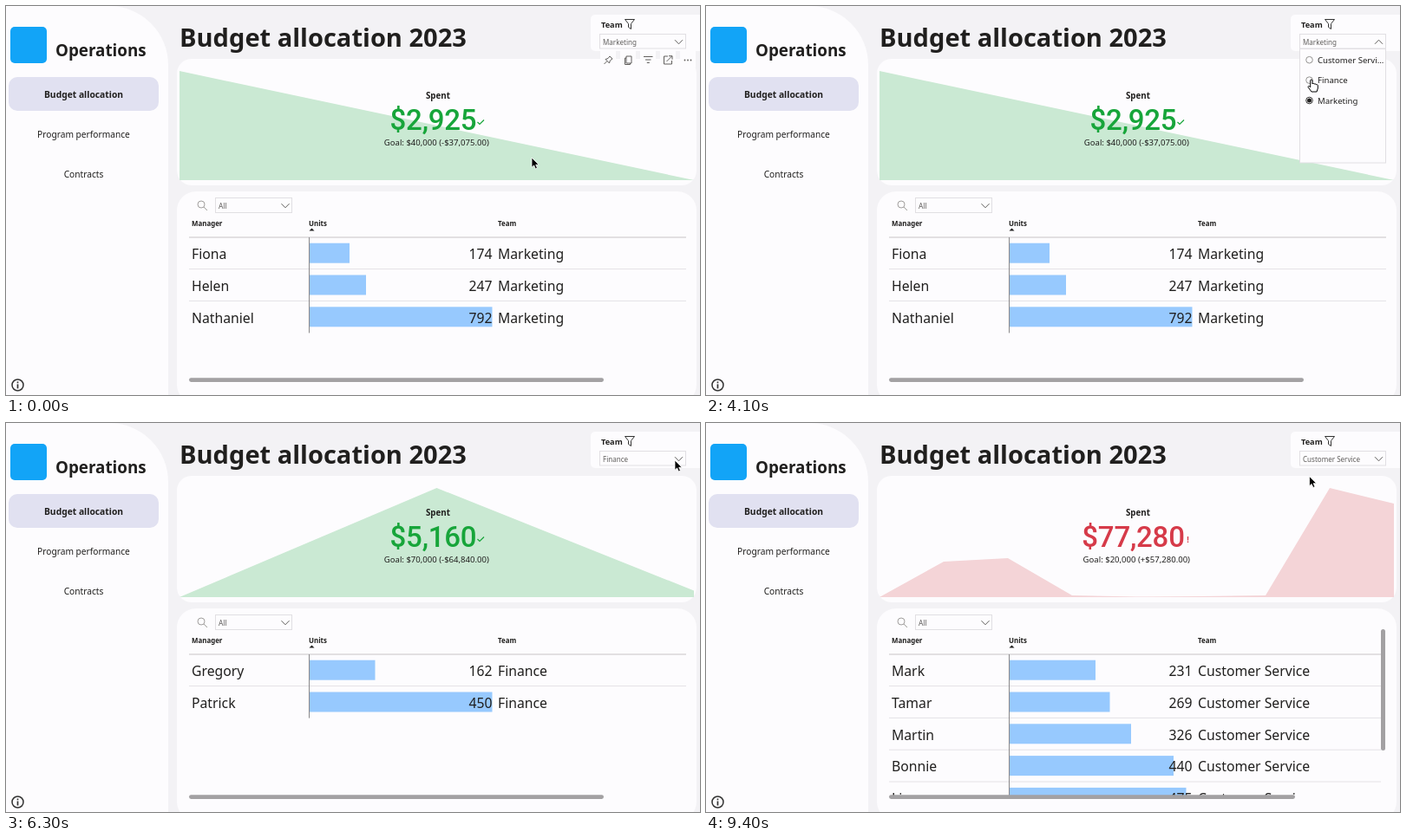
Animation, 800 px wide and 449 px high, one loop 9500 ms. Source, as an HTML page:

```html
<!DOCTYPE html>
<html lang="en">
<head>
<meta charset="utf-8">
<title>Budget allocation</title>
<style>
  html, body { margin: 0; width: 100%; height: 100%; overflow: hidden; background: #f3f2f5; }
  svg { display: block; font-family: "Noto Sans", "Open Sans", sans-serif; }
</style>
</head>
<body>
<svg id="stage" width="800" height="449" viewBox="0 0 800 449">
  <g id="page"></g>
  <g id="cursor"></g>
</svg>
<script>
const LOOP = 9500;
const INK = '#201f1e', PANEL = '#fdfcfe', GREY = '#605e5c';
const TEAMS = ['Customer Service', 'Finance', 'Marketing'];
const BASE = 201, ROW = 36.8;

const DATA = {
  'Marketing': {
    value: '$2,925', goal: 'Goal: $40,000 (-$37,075.00)', good: true,
    trend: [[200, 75], [793, BASE]],
    rows: [['Fiona', 174, 396], ['Helen', 247, 415], ['Nathaniel', 792, 560.5]]
  },
  'Finance': {
    value: '$5,160', goal: 'Goal: $70,000 (-$64,840.00)', good: true,
    trend: [[200, BASE], [496.5, 75], [793, 193.5]],
    rows: [['Gregory', 162, 425.5], ['Patrick', 450, 560.5]]
  },
  'Customer Service': {
    value: '$77,280', goal: 'Goal: $20,000 (+$57,280.00)', good: false,
    trend: [[200, BASE], [274, 160], [348, 156], [422, 199], [496, 200.5],
            [570, 200], [645, 199], [719, 75], [793, 93]],
    rows: [['Mark', 231, 449], ['Tamar', 269, 465.5], ['Martin', 326, 490],
           ['Bonnie', 440, 539], ['Liora', 475, 553.5]]
  }
};

const text = (x, y, size, str, opt = '') =>
  `<text x="${x}" y="${y}" font-size="${size}" fill="${INK}" ${opt}>${str}</text>`;
const rect = (x, y, w, h, fill, r = 0, opt = '') =>
  `<rect x="${x}" y="${y}" width="${w}" height="${h}" rx="${r}" fill="${fill}" ${opt}/>`;
const path = (d, stroke = GREY, width = 1, fill = 'none') =>
  `<path d="${d}" stroke="${stroke}" stroke-width="${width}" fill="${fill}"/>`;
const circle = (x, y, r, opt) => `<circle cx="${x}" cy="${y}" r="${r}" ${opt}/>`;
const chevron = (x, y, dir) => path(`M${x - 4.5} ${y - 2.3 * dir}l4.5 ${4.6 * dir}l4.5 ${-4.6 * dir}`);
const BOLD = 'font-weight="700"', MID = 'text-anchor="middle"', END = 'text-anchor="end"';
const FRAME = 'stroke="#e1dfe3"';

function sidebar() {
  return path('M0 0H119A68 68 0 0 1 187 68V449H0Z', 'none', 0, PANEL) +
    rect(5, 24, 42, 42, '#12a4f7', 5) +
    text(57, 57.5, 18.8, 'Operations', BOLD) +
    rect(3, 82, 173, 39, '#e1e1f1', 10) +
    text(89.5, 106, 10.3, 'Budget allocation', BOLD + MID) +
    text(89.5, 152, 10.2, 'Program performance', MID) +
    text(89.5, 197.5, 10.2, 'Contracts', MID) +
    circle(13.5, 437.5, 6.5, 'fill="none" stroke="#333" stroke-width="1.5"') +
    path('M13.5 436.5V441.5M13.5 433.5V435.2', '#333', 1.7);
}

function budgetCard({ value, goal, good, trend }) {
  const color = good ? '#17a53a' : '#d63a49';
  const area = `M200 ${BASE}L${trend.join('L')}L793 ${BASE}Z`;
  return rect(197, 61, 599, 146, PANEL, 17) +
    path(area, 'none', 0, good ? '#cae9d3' : '#f4d4d7') +
    text(498, 107, 9.8, 'Spent', BOLD + MID) +
    `<text x="492.5" y="143" font-size="33" font-weight="500" letter-spacing="-.2" fill="${color}"
      text-anchor="middle" font-family="Roboto, sans-serif">${value}</text>` +
    (good ? path('M543.5 134l2.5 2.5l5-5', color, 1.2)
          : path('M555.5 131v4.5M555.5 136.5v1.5', color, 1.3)) +
    text(496.3, 160.5, 9.55, goal, MID);
}

function tableCard(team, { rows }) {
  const long = rows.length > 4;
  const right = long ? 778 : 784;
  const bottom = long ? 430 : 267 + rows.length * ROW;
  return rect(197, 214, 599, 245, PANEL, 22) +
    circle(225, 229, 4, 'fill="none" stroke="#a19f9d"') + path('M228 232l4 4', '#a19f9d') +
    rect(241.5, 221.5, 88, 17, PANEL, 0, FRAME) +
    text(245, 234, 8.4, 'All', `style="fill:${GREY}"`) + chevron(322, 230.5, 1) +
    text(214, 253.5, 7.9, 'Manager', BOLD) + text(349, 253.5, 7.9, 'Units', BOLD) +
    text(567, 253.5, 7.9, 'Team', BOLD) +
    path('M349.5 259.5l3-3l3 3z', 'none', 0, INK) +
    path(`M211 267H${right}`, '#c8c6c8', 1.2) +
    '<clipPath id="body"><path d="M200 260H790V430H200Z"/></clipPath><g clip-path="url(#body)">' +
    rows.map(([name, units, end], i) => {
      const y = i * ROW;
      return (i ? path(`M211 ${266.8 + y}H${right}`, '#e4e2e6') : '') +
        rect(349.5, 273.7 + y, end - 349.5, 23, '#97c9fe') +
        text(214, 292 + y, 15.75, name) +
        text(560.5, 292 + y, 15.75, units, END) +
        text(567, 292 + y, 15.75, team);
    }).join('') + path(`M349.5 267V${bottom}`, '#8a888a') + '</g>' +
    rect(211, 429.3, long ? 468 : 478, 4.6, '#a3a1a3', 2.3) +
    (long ? rect(778, 238, 5, 140, '#a3a1a3', 2.5) : '');
}

function slicer(label, open) {
  return rect(674, 10, 130, 42, PANEL, 5) +
    text(686, 25, 9.2, 'Team', BOLD) +
    path('M713.5 15.5H724.5L720.5 20.5V26.5L717.5 24.5V20.5Z', '#333') +
    rect(684.5, 32.5, 99, 16.5, PANEL, 0, FRAME) +
    text(688, 45, 8.05, label, `style="fill:${GREY}"`) +
    chevron(775.5, 41.5, open ? -1 : 1);
}

function toolbar() {
  return [694, 717, 740, 763, 786].map(x => rect(x - 9, 52, 18, 19, PANEL)).join('') +
    path('M689.5 67l3.5-3.5M691 61.5l4.5 4.5l.8-3l2.7-2l-3-3l-2 2.5z') +
    path('M715 58h6v8h-6zM715 60h-1.5v7.5h6V66') +
    path('M735 58.5h10.5M737 62h6.5M738.8 65.5h3') +
    path('M763 58h-4.5v9h9V63M761.5 64l6-6M764 57.7h4v4') +
    [782.5, 786, 789.5].map(x => circle(x, 62.5, .9, `fill="${GREY}"`)).join('');
}

function popup(chosen) {
  return rect(684.5, 49.5, 99, 131.5, PANEL, 0, FRAME) +
    TEAMS.map((team, i) => {
      const y = 62.2 + i * 23.4, on = team === chosen;
      return circle(695.5, y, 3.8, `fill="none" stroke="${on ? INK : '#8a8886'}" stroke-width=".9"`) +
        (on ? circle(695.5, y, 2.5, `fill="${INK}"`) : '') +
        text(705, y + 3.8, 9.6, i ? team : 'Customer Servi...');
    }).join('');
}

const ARROW = path('M0 0V11.3L2.6 8.9L4.4 13L6.4 12.1L4.7 8.2H8.2Z', '#fff', .8, '#000');
const HAND = path('M-.3 0C-.3-1.4 2-1.4 2 0V4C2.3 3 4 3.1 4.1 4.2C4.7 3.5 6.1 3.8 6.2 4.8' +
  'C7.2 4.2 8.3 4.7 8.3 6V9L7 13H1L-3 7.6C-3.2 6.3-1.7 6-.3 7.7Z', '#000', 1, '#fff');

// Each stop: start time, travel time, x, y
const STOPS = [[0, 0, 606, 175], [1200, 0, 762, 48], [2700, 900, 697, 86],
               [5500, 800, 771, 43], [7100, 400, 695.5, 61.5]];

function cursorAt(t) {
  const i = STOPS.findLastIndex(s => s[0] <= t);
  const [start, span, x, y] = STOPS[i];
  if (!span) return [x, y];
  const [, , px, py] = STOPS[i - 1];
  const k = Math.min(1, (t - start) / span), e = k * k * (3 - 2 * k);
  return [px + (x - px) * e, py + (y - py) * e];
}

const within = (t, a, b) => t >= a && t < b;
const byTime = (t, first, second) => TEAMS[t < first ? 2 : t < second ? 1 : 0];
const page = document.getElementById('page'), cursor = document.getElementById('cursor');
const begin = performance.now();
let shown = '';

function draw() {
  const t = (performance.now() - begin) % LOOP;
  const team = byTime(t, 5000, 9300), label = byTime(t, 4700, 8900);
  const open = within(t, 1200, 4700) || within(t, 6600, 8900);
  const tools = t < 1200 || within(t, 4700, 5900);
  const hand = within(t, 3700, 4700) || within(t, 7500, 8900);
  const state = [team, label, open, tools, hand].join();
  if (state !== shown) {
    shown = state;
    page.innerHTML = sidebar() + text(200, 47, 29.05, 'Budget allocation 2023', BOLD) +
      budgetCard(DATA[team]) + tableCard(team, DATA[team]) + slicer(label, open) +
      (tools ? toolbar() : '') + (open ? popup(label) : '');
    cursor.innerHTML = hand ? HAND : ARROW;
  }
  cursor.setAttribute('transform', `translate(${cursorAt(t)})`);
  requestAnimationFrame(draw);
}

draw();
</script>
</body>
</html>
```
